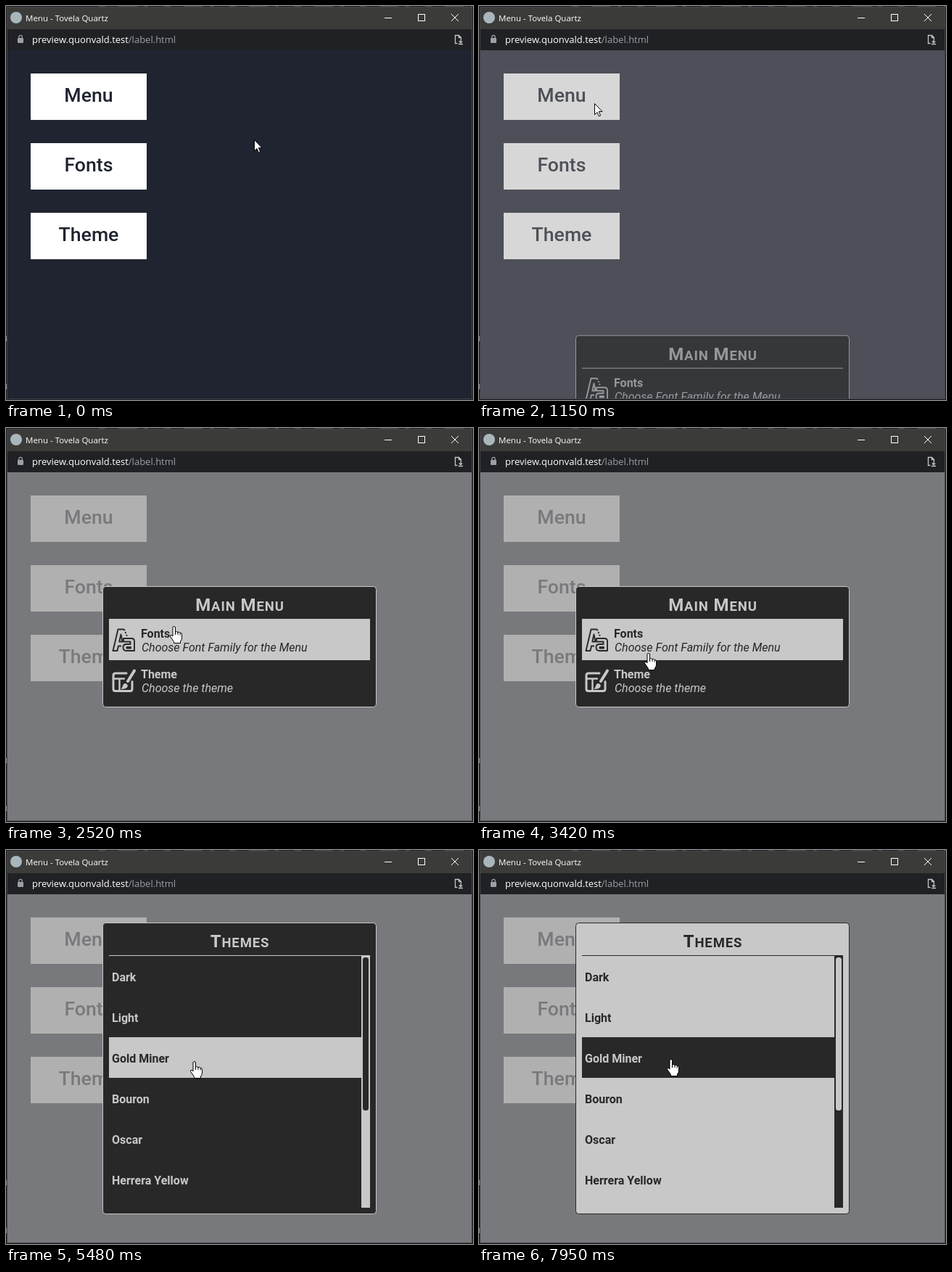
An HTML page that plays this animation: 644x543 px, repeating every 8000 ms.

```html
<!DOCTYPE html>
<html lang="en">
<head>
<meta charset="utf-8">
<title>Menu</title>
<style>
  html, body { margin: 0; width: 100%; height: 100%; overflow: hidden; background: #1d1d1f; }
  svg { display: block; width: 644px; height: 543px; }
  text { font-family: Roboto, sans-serif; }
  .ui { font-family: "Open Sans", "Noto Sans", sans-serif; }
  .line { fill: none; stroke: currentColor; }
  .button rect { fill: #fff; }
  .button text { fill: #1f2430; font-size: 26.67px; font-weight: 500; text-anchor: middle; }
  .dialog { --fg: #c8c8c8; --bg: #282828; color: var(--fg); }
  .dialog.light { --fg: #282828; --bg: #c8c8c8; }
  .frame { fill: var(--bg); stroke: var(--fg); }
  .heading { font-size: 24px; font-weight: 700; text-anchor: middle; letter-spacing: .9px; fill: var(--fg); }
  .heading .small { font-size: 18.5px; }
  .row { color: var(--fg); font-size: 16px; }
  .row > rect { fill: none; }
  .row.on { color: var(--bg); }
  .row.on > rect { fill: var(--fg); }
  .row text { fill: currentColor; }
  .name { font-weight: 700; }
  .note { font-style: italic; }
  .cursor path { fill: #fff; stroke: #000; stroke-linejoin: round; }
</style>
</head>
<body>
<svg viewBox="0 0 644 543">
  <defs>
    <clipPath id="view"><rect x="2" y="61" width="640" height="480"/></clipPath>
    <g id="letters" class="line" stroke-width="1.9" stroke-linejoin="round">
      <path d="M13 25H9L7.5 31.500H1.500L8.500 2H17M12.500 9L10.300 19H14.500Z"/>
      <path d="M17 2L21.500 13" stroke-dasharray="2 2"/>
      <path d="M16 19V14.500H27Q31 14.500 31 18.500V31.500H20Q15.500 31.500 15.500 27Q15.500 22.500 20 22.500H25.500V19Z"/>
      <path d="M20.500 26.500H26V28H20.500Z"/>
    </g>
    <g id="brush" class="line" stroke-width="3" stroke-linecap="round">
      <path d="M20 6.500H5Q2 6.500 2 9.500V28Q2 31 5 31H25Q28 31 28 28V18"/>
      <path d="M2 14H17M10.500 14V30" stroke-width="2.4"/>
      <path d="M31 3L22 17.500" stroke-width="4"/>
      <path d="M12.500 28Q15 26 15.500 22.500Q17 19.500 20 21Q23 23 21 26Q18 29 12.500 28Z" fill="currentColor" stroke="none"/>
    </g>
  </defs>

  <!-- window -->
  <path d="M128 .5H644" stroke="#77705c" stroke-dasharray="9 18 26 10 5 22" opacity=".55"/>
  <path d="M.5 455v7M.5 521v7" stroke="#8b8b8b"/>
  <rect x="1.500" y="1.500" width="641" height="540" fill="#202124" stroke="#41444c"/>
  <rect x="2" y="2" width="640" height="30" fill="#3b3b39"/>
  <circle cx="14" cy="16" r="8" fill="#a9b7bd"/>
  <text class="ui" x="27" y="21" font-size="11.5" fill="#fff">Menu - Tovela Quartz</text>
  <g fill="none" stroke="#fff">
    <path d="M522 16.500h10M614 11l10 10M624 11l-10 10"/>
    <rect x="568.500" y="11.500" width="9" height="9"/>
  </g>
  <rect x="16" y="44" width="8" height="7" rx="1" fill="#9aa0a6"/>
  <path d="M17.800 44.500v-2a2.200 2.200 0 0 1 4.400 0v2" fill="none" stroke="#9aa0a6" stroke-width="1.300"/>
  <text class="ui" x="36" y="51" font-size="13" fill="#fff">preview.quonvald.test<tspan fill="#9aa0a6">/label.html</tspan></text>
  <path d="M622.500 51.500h-3v-11h5l3 3v3M624.500 40.500v3h3M627 46.500v4M624.800 48.500l2.200 2.200 2.200-2.200M624 52.500h6" fill="none" stroke="#c4c7ca" stroke-width="1.300"/>

  <!-- page -->
  <g clip-path="url(#view)">
    <rect x="2" y="61" width="640" height="480" fill="#1f2430"/>
    <g id="buttons"></g>
    <rect id="shade" x="2" y="61" width="640" height="480" fill="#969696"/>
    <g id="main" class="dialog"></g>
    <g id="themes" class="dialog"></g>
  </g>

  <g id="cursor" class="cursor">
    <circle id="click" r="12" fill="#e2de3c" fill-opacity=".82"/>
    <path id="arrow" d="M.5 .5V15.800L4 12.500L6.400 17.900L8.600 16.900L6.300 11.500H11Z"/>
    <g id="hand">
      <path d="M-2 2Q-2 .5-.3 .5T1.500 2V8Q3.500 7 5 8.500Q7 7.800 8.200 9.500Q10.500 9 10.500 11.500V16Q10.500 19 8.500 21V23.500H-.5V21.500L-5.300 14.500Q-6 12.300-4 12.200L-2 14Z"/>
      <path d="M1.500 8v4M5 8.500v3.500M8.200 9.500v3"/>
    </g>
  </g>
</svg>
<script>
const $ = id => document.getElementById(id);
const LOOP = 8000, STEP = 80, ROW = 56, LIST = 46;

// Spans during which the picture advances every STEP ms; it rests between them.
const RUNS = [[0, 0], [170, 650], [820, 820], [990, 1710], [1960, 2600], [2770, 3090],
  [3260, 3660], [3910, 4070], [4400, 4480], [4650, 4650], [4820, 4820], [5400, 6360],
  [6530, 6530], [6700, 6700], [6870, 6950], [7120, 7120], [7290, 7290], [7710, 7950]];

const smooth = p => p * p * (3 - 2 * p);
const easeOut = p => p * (2 - p);
const linear = p => p;

// Pointer moves: start, end, x, y, easing
const MOVES = [
  [90, 650, 159, 134, smooth],
  [1880, 2520, 232, 273, smooth],
  [2520, 2600, 233, 275, linear],
  [2690, 3090, 235, 338, smooth],
  [3180, 3660, 233, 282, smooth],
  [3830, 4070, 236, 334, smooth],
  [4320, 4480, 234, 344, smooth],
  [5320, 5480, 260, 291, linear],
  [5480, 6200, 285, 199, easeOut],
  [6200, 6360, 287, 190, linear],
  [6790, 6950, 278, 214, smooth],
  [7630, 7950, 265, 288, smooth]
];
const CLICKS = [820, 4650, 6530, 7120];
const CLICK_TIME = 170, OPEN = 910, OPEN_TIME = 800, SWITCH = 4820, RECOLOR = 7290;

const clamp = v => Math.max(0, Math.min(1, v));
const show = (el, on) => el.style.display = on ? "" : "none";

const heading = words => words.split(" ").map(w =>
  `${w[0]}<tspan class="small">${w.slice(1).toUpperCase()}</tspan>`).join(" ");

const row = (i, width, body) =>
  `<g class="row" transform="translate(142 ${LIST + i * ROW})"><rect width="${width}" height="${ROW}"/>${body}</g>`;

const dialog = (title, height, body) =>
  `<rect class="frame" x="133.5" y=".5" width="377" height="${height}" rx="4"/>
   <text class="heading" x="322.5" y="34">${heading(title)}</text>
   <path class="line" d="M142 45.500H502"/>${body}`;

$("buttons").innerHTML = ["Menu", "Fonts", "Theme"].map((label, i) =>
  `<g class="button" transform="translate(34 ${93 + i * 96})">
   <rect width="160" height="64"/><text x="80" y="39">${label}</text></g>`).join("");

$("main").innerHTML = dialog("Main Menu", 166, [
  ["Fonts", "Choose Font Family for the Menu", "letters"],
  ["Theme", "Choose the theme", "brush"]
].map(([name, note, icon], i) => row(i, 360,
  `<use href="#${icon}" x="4" y="11.5"/>
   <text class="name" x="44" y="25">${name}</text>
   <text class="note" x="45" y="44">${note}</text>`)).join(""));

$("themes").innerHTML = dialog("Themes", 401,
  ["Dark", "Light", "Gold Miner", "Bouron", "Oscar", "Herrera Yellow"].map((name, i) =>
    row(i, 348, `<text class="name" x="4" y="35">${name}</text>`)).join("") +
  `<rect x="490" y="46" width="12" height="347" fill="var(--fg)"/>
   <rect x="492" y="48" width="8" height="211" rx="3.5" fill="var(--bg)"/>`);

const rows = { main: [...$("main").querySelectorAll(".row")],
               themes: [...$("themes").querySelectorAll(".row")] };

function held(t) {
  const [a, b] = RUNS.filter(r => r[0] <= t).pop();
  return a + Math.floor((Math.min(t, b) - a) / STEP) * STEP;
}

function pointer(t) {
  let x = 342, y = 184;
  for (const [a, b, tx, ty, ease] of MOVES) {
    const p = ease(clamp((t - a) / (b - a)));
    x += (tx - x) * p;
    y += (ty - y) * p;
  }
  return [Math.round(x), Math.round(y)];
}

function draw(t) {
  const [x, y] = pointer(t);
  const open = easeOut(clamp((t - OPEN) / OPEN_TIME));
  const page = t < SWITCH ? "main" : "themes";
  const top = page === "main" ? 218 + 481 * (1 - open) : 100;
  const hover = open < 1 ? -1 : Math.floor((y - top - LIST) / ROW);

  $("shade").setAttribute("opacity", .75 * open);
  show($("main"), page === "main" && open > 0);
  show($("themes"), page === "themes");
  $(page).setAttribute("transform", `translate(0 ${top})`);
  $(page).setAttribute("opacity", Math.pow(open, .75));
  $("themes").classList.toggle("light", t >= RECOLOR);
  rows[page].forEach((r, i) => r.classList.toggle("on", i === hover));

  $("cursor").setAttribute("transform", `translate(${x} ${y})`);
  show($("click"), CLICKS.some(c => t >= c && t < c + CLICK_TIME));
  show($("hand"), hover >= 0);
  show($("arrow"), hover < 0);
}

function tick() {
  draw(held(performance.now() % LOOP));
  requestAnimationFrame(tick);
}
tick();
</script>
</body>
</html>
```
